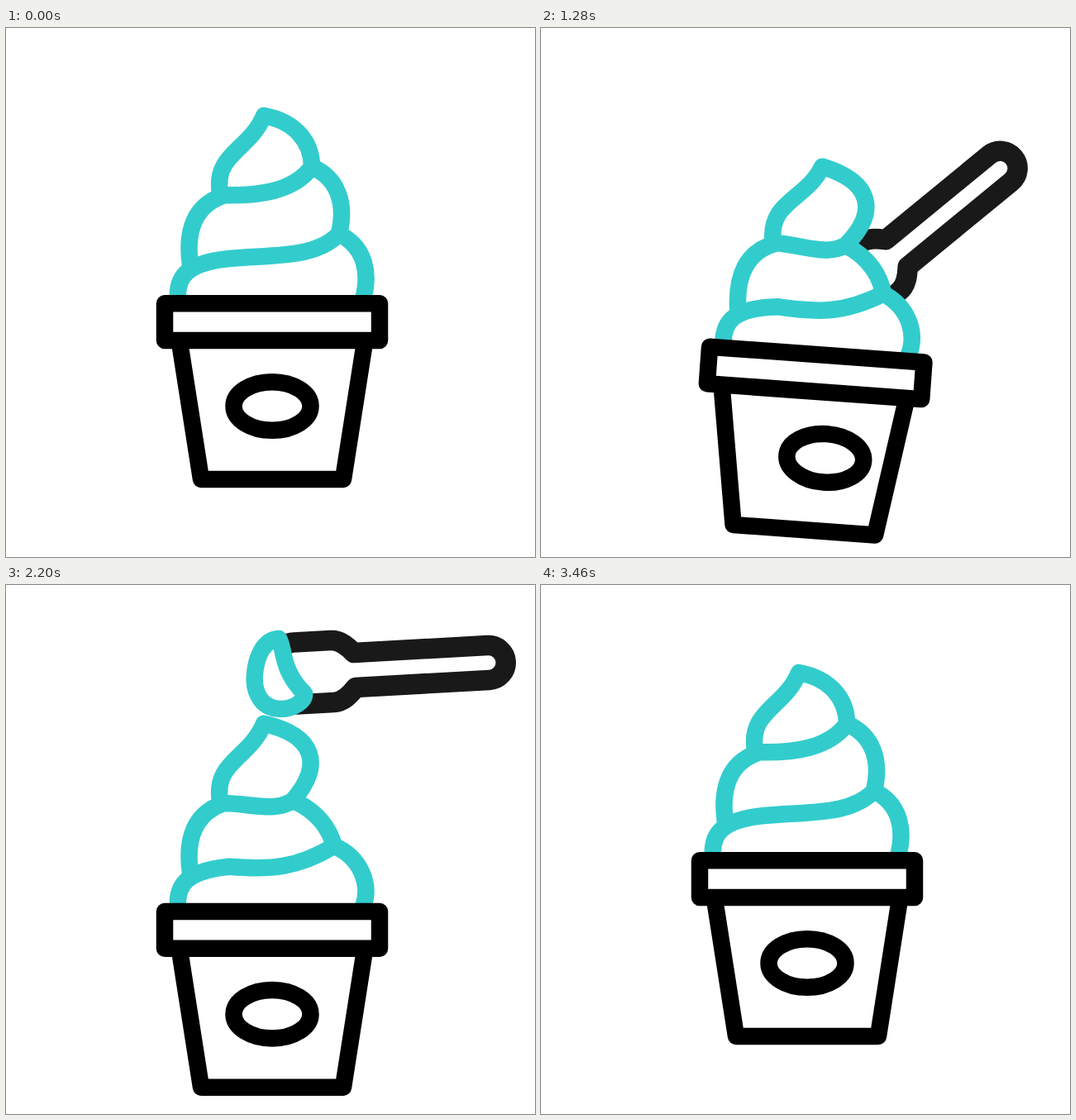
Write an HTML page that moves like this. It is 640x640 px and loops after 3600 ms.

```html
<!DOCTYPE html>
<html lang="en">
<head>
<meta charset="utf-8">
<title>Frozen yogurt</title>
<style>
  html, body { margin: 0; width: 100%; height: 100%; overflow: hidden; background: #fff; }
  svg { display: block; width: 100%; height: 100%; }
  path, rect, ellipse { stroke-linejoin: round; stroke-linecap: round; }
  .cream { fill: none; stroke: #33cccc; stroke-width: 20.5; }
  .cup { fill: #fff; stroke: #000; stroke-width: 20.5; }
  .spoon { fill: #fff; stroke: #191919; stroke-width: 24.5; }
</style>
</head>
<body>
<svg viewBox="0 0 640 640">
  <g id="spoon">
    <path class="spoon" d="M0 -21H162A21 21 0 0 1 162 21H0C-8 30 -16 37.5 -27 37.5H-72C-106 37.5 -106 -37.5 -72 -37.5H-27C-16 -37.5 -8 -30 0 -21Z"/>
    <path id="scoop" class="cream" style="fill:#fff" transform="rotate(3.2) translate(-422 -103)"
      d="M330 65C337 75 332 103 361 131C362 141 347 150 333 150C305 150 299 124 301 107C303 86 312 66 330 65Z"/>
  </g>
  <g id="cup">
    <path id="fill" fill="#fff"/>
    <path id="swirl" class="cream"/>
    <path class="cup" d="M210 380L236 546H408L434 380"/>
    <ellipse id="badge" class="cup" cx="322" cy="457.5" rx="46.5" ry="29.3"/>
    <rect class="cup" x="192" y="333.3" width="260" height="44.7"/>
  </g>
  <path id="swoosh" class="cream" pathLength="100" d="M218 154Q198 182 187 227"/>
</svg>
<script>
const LOOP = 3600, PIVOT = { x: 322, y: 496 }, RAD = Math.PI / 180;
const el = id => document.getElementById(id);
const mix = (a, b, p) => a + (b - a) * p;
const part = (t, a, b) => Math.min(1, Math.max(0, (t - a) / (b - a)));
const smooth = p => p * p * (3 - 2 * p);

// Eased value at time t from [time, value] steps
function track(t, steps) {
  let value = steps[0][1];
  for (let i = 1; i < steps.length; i++) {
    if (t < steps[i - 1][0]) break;
    value = mix(steps[i - 1][1], steps[i][1], smooth(part(t, steps[i - 1][0], steps[i][0])));
  }
  return value;
}

// Swings right, then left, then back to rest
const swing = (t, right, left) =>
  track(t, [[680, 0], [1000, right], [1160, right], [1520, left], [1740, left], [2200, 0]]);

// Curves of the swirl: [whole, pressed in by the spoon]
const curves = {
  low: ["C330 274 375 278 403 249", "C320 283 352 281 397 254"],
  lowRight: ["C436 266 440 298 432 328", "C429 268 442 300 432 328"],
  mid: ["C305 204 348 198 370 168", "C295 202 325 214 347 199"],
  midRight: ["C401 181 412 212 403 249", "C378 212 392 235 397 254"],
  topRight: ["C350 113 370 138 370 168", "C374 120 384 156 347 199"]
};
const LOW_LEFT = "M208 328C206 300 220 284 270 279";
const MID_LEFT = "M223 287C217 245 228 215 262 203";
const TOP_LEFT = "259 200C251 152 295 148 312 106";

function blend([a, b], p) {
  const ends = b.match(/\d+/g);
  let i = 0;
  return a.replace(/\d+/g, n => mix(+n, +ends[i++], p).toFixed(2));
}

function drawSwirl(bite) {
  const c = {};
  for (const key in curves) c[key] = blend(curves[key], bite);
  const right = c.topRight + c.midRight + c.lowRight;
  el("swirl").setAttribute("d",
    LOW_LEFT + c.low + MID_LEFT + "M258 202" + c.mid + "M" + TOP_LEFT + right);
  el("fill").setAttribute("d", MID_LEFT + "L" + TOP_LEFT + right + "L208 328Z");
}

function spoonPose(t, rise, tilt) {
  // Pose held by the cup
  const enter = 1 - (1 - part(t, 230, 540)) ** 2;
  const dig = smooth(part(t, 700, 1540));
  const x = mix(mix(735, 414.7, enter), 408, dig) - PIVOT.x;
  const y = mix(mix(120, 207.5, enter), 203, dig) - PIVOT.y;
  const angle = track(t, [[240, -30], [560, -38], [1020, -39.7], [1540, -47.3]]) + tilt;
  const cos = Math.cos(tilt * RAD), sin = Math.sin(tilt * RAD);
  const held = {
    x: PIVOT.x + x * cos - y * sin,
    y: PIVOT.y + rise + x * sin + y * cos
  };
  // Lifted out, then carried off
  const lift = smooth(part(t, 1600, 2010));
  const liftY = smooth(part(t, 1580, 1950));
  const away = part(t, 2800, 3320) ** 2;
  return {
    x: mix(held.x, 422, lift) + 387 * away,
    y: mix(held.y, 103, liftY) - 175 * away,
    angle: mix(angle, -3.2, lift)
  };
}

function draw(t) {
  const rise = track(t, [[455, 0], [785, -80], [1295, 61.7], [3033, 61.7], [3460, 0]]);
  const tilt = swing(t, 8.75, -8.75);
  const bite = track(t, [[460, 0], [690, 1], [2800, 1], [3380, 0]]);

  drawSwirl(bite);
  el("cup").setAttribute("transform", `translate(0 ${rise}) rotate(${tilt} ${PIVOT.x} ${PIVOT.y})`);
  el("badge").setAttribute("transform", `translate(${swing(t, 38, -34)} 0)`);

  const s = spoonPose(t, rise, tilt);
  el("spoon").setAttribute("transform", `translate(${s.x} ${s.y}) rotate(${s.angle})`);
  el("spoon").style.display = t >= 240 && t < 3320 ? "" : "none";
  el("scoop").style.display = t > 700 ? "" : "none";

  const head = 100 * smooth(part(t, 1400, 1550)), tail = 100 * smooth(part(t, 1570, 1740));
  const swoosh = el("swoosh").style;
  swoosh.display = head > tail ? "" : "none";
  swoosh.strokeDasharray = `${head - tail} 300`;
  swoosh.strokeDashoffset = -tail;
}

const start = performance.now();
function tick() {
  draw((performance.now() - start) % LOOP);
  requestAnimationFrame(tick);
}
tick();
</script>
</body>
</html>
```
